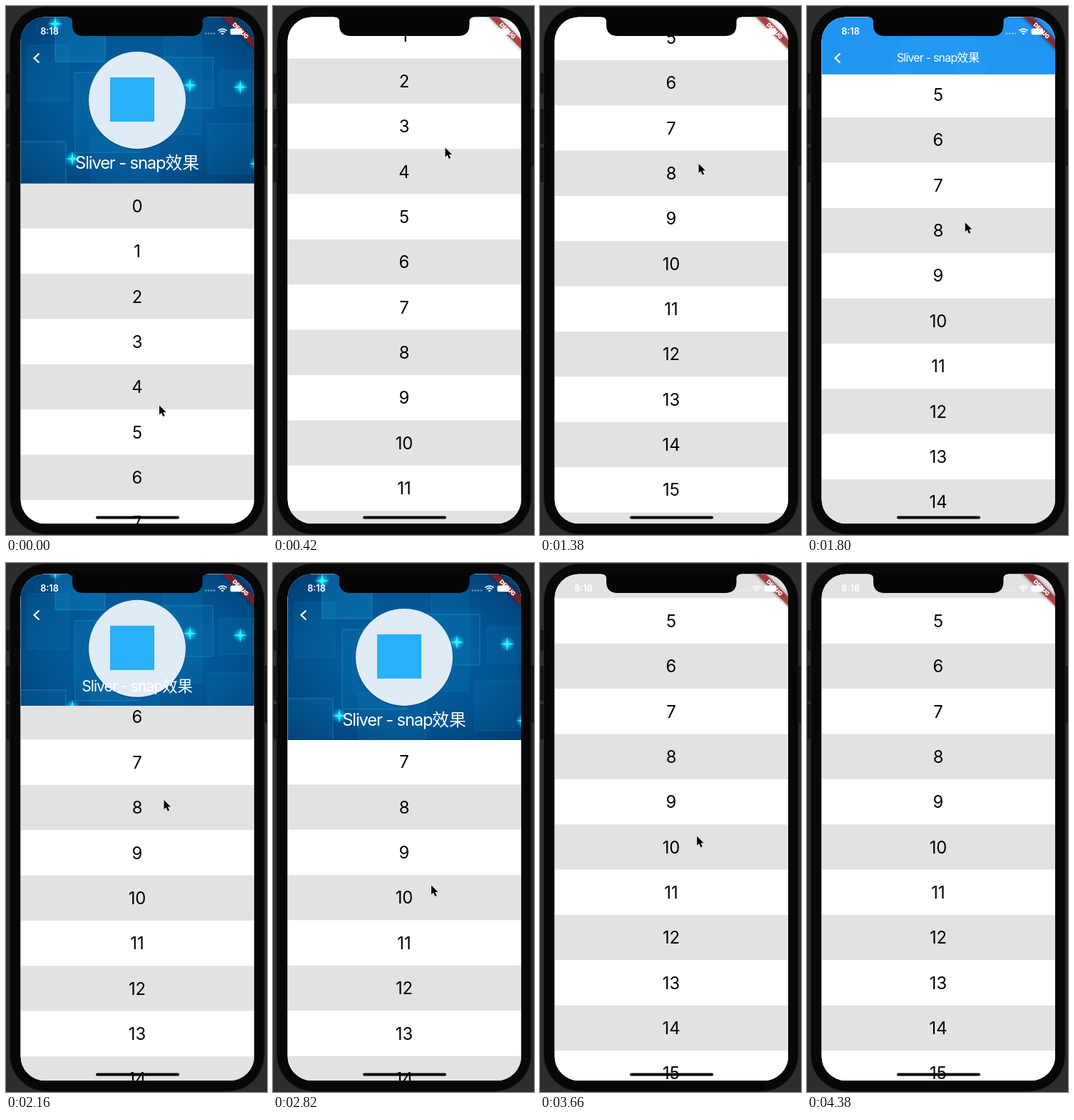
Write an HTML page that moves like this. It is 366 px wide and 741 px high and loops after 4440 ms.

```html
<!DOCTYPE html>
<html lang="en">
<head>
<meta charset="utf-8">
<title>Snapping app bar</title>
<style>
html, body { margin: 0; width: 100%; height: 100%; overflow: hidden; background: #2b2d2f; }
#stage { display: block; width: 366px; height: 741px; font-family: Inter, Roboto, "Noto Sans CJK SC", "Noto Sans CJK", sans-serif; }
text { text-anchor: middle; }
#rows text { font-size: 23.8px; }
#title { font-size: 15.84px; fill: #fff; letter-spacing: -.048em; }
#title tspan { letter-spacing: 0; }
</style>
</head>
<body>
<svg id="stage" viewBox="0 0 366 741">
  <defs>
    <clipPath id="screen"><rect x="20.5" y="15.5" width="327.5" height="709.5" rx="34"/></clipPath>
    <radialGradient id="sea" cx=".5" cy=".5" r=".7">
      <stop offset="0" stop-color="#0468ac"/>
      <stop offset=".6" stop-color="#02538f"/>
      <stop offset="1" stop-color="#013c70"/>
    </radialGradient>
    <radialGradient id="glow">
      <stop offset="0" stop-color="#3ff"/>
      <stop offset=".3" stop-color="#1de0f5" stop-opacity=".75"/>
      <stop offset="1" stop-color="#0af" stop-opacity="0"/>
    </radialGradient>
    <g id="star">
      <circle r="11" fill="url(#glow)"/>
      <path d="M0-10L1.5-1.5L10 0L1.5 1.5L0 10L-1.5 1.5L-10 0L-1.5-1.5Z" fill="#2ef4ff"/>
    </g>
    <filter id="soft" x="-30%" y="-100%" width="160%" height="300%"><feGaussianBlur stdDeviation="2"/></filter>
  </defs>

  <!-- phone body -->
  <g fill="#161718" stroke="#090909">
    <rect x="1.5" y="95" width="6" height="27"/>
    <rect x="1.5" y="145" width="6" height="47"/>
    <rect x="1.5" y="199" width="6" height="47"/>
    <rect x="360.500" y="145" width="6" height="78"/>
  </g>
  <rect x="5.500" y="1" width="356.500" height="739" rx="51" fill="#070707" stroke="#191a1b"/>

  <g clip-path="url(#screen)">
    <rect x="20" y="15" width="329" height="711" fill="#fff"/>
    <g id="rows"></g>

    <svg id="bar" x="20.5" y="15.5" width="327.500" height="233">
      <g id="sheet">
        <rect x="20" y="15" width="329" height="234" fill="#2196f3"/>
        <g id="art">
          <rect x="20" y="15" width="329" height="234" fill="url(#sea)"/>
          <g fill="#1493cf" fill-opacity=".1" stroke="#1aa5dc" stroke-opacity=".5">
            <rect x="69" y="5" width="70" height="73" fill-opacity=".3"/>
            <rect x="97" y="93" width="90" height="112"/>
            <rect x="180" y="72" width="110" height="71"/>
            <rect x="10" y="190" width="74" height="70"/>
            <g stroke-opacity=".18">
              <rect x="30" y="55" width="57" height="78"/>
              <rect x="283" y="165" width="80" height="70"/>
              <rect x="120" y="182" width="94" height="80"/>
              <rect x="222" y="30" width="52" height="150"/>
              <rect x="300" y="90" width="60" height="50"/>
            </g>
          </g>
          <use href="#star" x="69" y="25"/>
          <use href="#star" x="258" y="111"/>
          <use href="#star" x="328.500" y="113.500"/>
          <use href="#star" x="93" y="214"/>
          <use href="#star" x="351" y="221"/>
          <circle cx="184" cy="133" r="68.500" fill="#002b55" opacity=".4"/>
          <circle cx="184" cy="132" r="68" fill="#dfebf5"/>
          <rect x="146" y="100" width="62" height="62" fill="#29b0f6"/>
        </g>
        <path id="back" d="M46.500 66.500L39.500 73L46.500 79.500" fill="none" stroke="#fff" stroke-width="2.200"/>
        <text id="title" y="5.500">Sliver - snap<tspan>效果</tspan></text>
      </g>
    </svg>

    <g transform="translate(348 15.500) rotate(45)">
      <rect x="-36" y="22.200" width="72" height="9.500" opacity=".5" filter="url(#soft)"/>
      <rect x="-36" y="22.200" width="72" height="9.500" fill="#b71c1c" fill-opacity=".63"/>
      <text y="29.900" font-size="8.080" font-weight="900" fill="#fff">DEBUG</text>
    </g>

    <g fill="#fff">
      <text x="61" y="40.300" font-size="12.700" font-weight="600">8:18</text>
      <g opacity=".45">
        <circle cx="280" cy="38.500" r="1.300"/><circle cx="284" cy="38.500" r="1.300"/>
        <circle cx="288" cy="38.500" r="1.300"/><circle cx="292" cy="38.500" r="1.300"/>
      </g>
      <path d="M301.500 38.500L303.500 40.500L305.500 38.500Q303.500 36.700 301.500 38.500Z"/>
      <path d="M297.500 34.500Q303.500 29.800 309.500 34.500M299.700 36.800Q303.500 33.600 307.300 36.800" fill="none" stroke="#fff" stroke-width="1.700"/>
      <rect x="314.500" y="31.500" width="16.500" height="8.800" rx="2.300"/>
      <rect x="331.700" y="34.300" width="1.300" height="3.200" rx=".6"/>
    </g>
  </g>

  <path d="M86 14V15.500Q92.500 15.500 93 21V26Q93 42 109 42H259.500Q275.500 42 275.500 26V21Q276 15.500 282.500 15.500V14Z" fill="#050505"/>
  <rect x="126" y="714.500" width="117" height="4" rx="2"/>
  <path id="cursor" d="M0 0V13L3 10.300L5.200 15.500L7.600 14.500L5.400 9.500H9.500Z" stroke="#fff" stroke-width="1" paint-order="stroke"/>
</svg>

<script>
const LOOP = 4440, STEP = 60, ROW = 63.36, LEFT = 20.5, TOP = 15.5;
const OPEN = 233, CLOSED = 79.2;   // app bar heights, expanded and collapsed
const FLUNG = 552.7, PULLED = 444.5, PUSHED = 515.8;   // scroll offsets at rest
const SNAP_OPEN = 2054, SNAP_SHUT = 3330, SNAP_TIME = 300;

const el = id => document.getElementById(id);
const clamp = v => Math.min(1, Math.max(0, v));
const mix = (a, b, p) => a + (b - a) * p;
const part = (t, from, to) => clamp((t - from) / (to - from));
const smooth = p => p * p * (3 - 2 * p);

// cubic-bezier(.25, .1, .25, 1)
function ease(x) {
  const curve = (a, b, u) => 3 * (1 - u) ** 2 * u * a + 3 * (1 - u) * u * u * b + u ** 3;
  let low = 0, high = 1;
  for (let i = 0; i < 24; i++) {
    const mid = (low + high) / 2;
    if (curve(.25, .25, mid) < x) low = mid; else high = mid;
  }
  return curve(.1, 1, low);
}

for (let i = 0; i < 21; i++) {
  el("rows").insertAdjacentHTML("beforeend",
    `<rect x="20" y="${i * ROW}" width="329" height="${ROW}" fill="${i % 2 ? "#fff" : "#e2e2e2"}"/>
     <text x="184" y="${i * ROW + 40.3}">${i}</text>`);
}

// drag, decaying fling, pull down, push up
function scrollAt(t) {
  if (t < 420) {
    const q = t / 420;
    return 126 * q * (1 - q) ** 2 + 301.7 * smooth(q) + 268 * q * q * (q - 1);
  }
  if (t < 1400) return Math.min(FLUNG, 301.7 + 319 * (1 - Math.exp(-.002 * (t - 420))));
  if (t < 2400) return mix(FLUNG, PULLED, smooth(part(t, 1400, 2000)));
  return mix(PULLED, PUSHED, smooth(part(t, 2800, 3227)));
}

function barHeight(t, scroll) {
  const snap = (start, from, to) => mix(from, to, ease(part(t, start, start + SNAP_TIME)));
  if (t < 1400) return Math.max(0, OPEN - scroll);
  if (t < SNAP_OPEN) return FLUNG - scroll;
  if (t < SNAP_OPEN + SNAP_TIME) return snap(SNAP_OPEN, FLUNG - PULLED, OPEN);
  if (t < SNAP_SHUT) return OPEN - (scroll - PULLED);
  return snap(SNAP_SHUT, OPEN - (PUSHED - PULLED), 0);
}

const path = [
  [0, 215, 559.5], [420, 241.5, 198.5], [840, 240.5, 194.5], [1100, 240.5, 194.5],
  [1380, 222.5, 221], [1400, 222.5, 221], [2000, 221.5, 332], [2300, 221.5, 332],
  [2750, 222, 452], [2800, 222, 452], [3227, 222, 378], [3400, 222, 378],
  [3700, 220, 383], [LOOP, 220, 383]
];

function cursorAt(t) {
  const i = path.findIndex(k => k[0] > t);
  const [t0, x0, y0] = path[i - 1], [t1, x1, y1] = path[i];
  const p = smooth(part(t, t0, t1));
  return [mix(x0, x1, p), mix(y0, y1, p)];
}

const move = (id, x, y, extra = "") => el(id).setAttribute("transform", `translate(${x} ${y}) ${extra}`);
const fade = (id, v) => el(id).setAttribute("opacity", v);

function draw(t) {
  const scroll = scrollAt(t), height = barHeight(t, scroll);
  move("rows", 0, TOP + OPEN - scroll);

  const extent = Math.max(height, CLOSED);
  const shrink = (OPEN - extent) / (OPEN - CLOSED);
  const scale = mix(1.5, 1, shrink);
  const tools = clamp((height - 34.8) / 44.4);
  el("bar").setAttribute("height", Math.max(0, height));
  move("sheet", -LEFT, height - extent - TOP);
  move("art", 0, (extent - OPEN) / 4);
  fade("art", 1 - part(shrink, .711, 1));
  move("title", 184, TOP + extent - 12.7 - 10.5 * scale, `scale(${scale})`);
  fade("title", tools);
  fade("back", part(tools, .25, 1));

  move("cursor", ...cursorAt(t));
  fade("cursor", t < 4080 ? 1 : 0);
}

const start = performance.now();
function tick() {
  const t = (performance.now() - start) % LOOP;
  draw(Math.floor(t / STEP) * STEP);
  requestAnimationFrame(tick);
}
tick();
</script>
</body>
</html>
```
